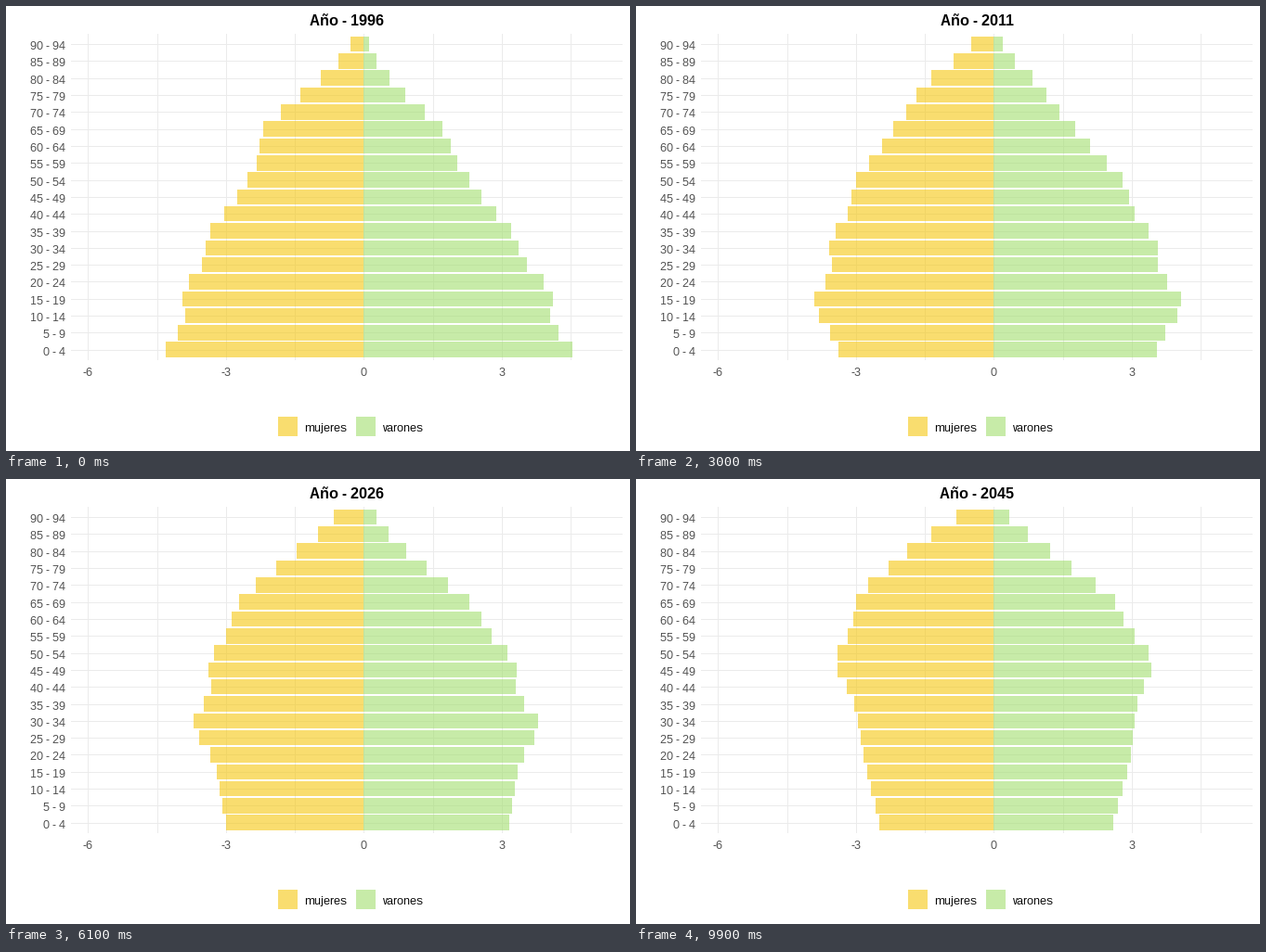
Recreate the animation shown at these times as a matplotlib script. Size 672 by 480 pixels, loop 10000 ms.

```python
import numpy as np
import matplotlib.pyplot as plt
from matplotlib.animation import FuncAnimation
from matplotlib.patches import Rectangle

W, H, DPI = 672, 480, 96
FRAMES, INTERVAL = 100, 100
FIRST, LAST = 1996, 2045
ZERO, UNIT = 385.3, 49.5          # pixel of x = 0, pixels per percent
BOTTOM, STEP, BAR = 370.7, 18.31, 16.5
YELLOW, GREEN, GRID, GREY = "#F5C710", "#A2DF6E", "#EBEBEB", "#4D4D4D"
ALPHA = 0.6

AGES = np.arange(19)              # five-year groups, youngest first

# Turning points of cohort size: birth year, length in pixels.
BIRTHS = [(1903, 58), (1928, 135), (1938, 132), (1948, 149),
          (1959, 177), (1968, 178), (1974, 192), (1979, 195),
          (1984, 187), (1989, 193), (1994, 203), (1999, 192),
          (2004, 175.5), (2009, 165), (2024, 148), (2043, 122)]


def women(year):
    """Cohort size times survival, with an early rise in the level."""
    cohort = np.interp(year - 5 * AGES - 2.5, *zip(*BIRTHS))
    old = 16.9 + 0.006 * (year - 2018)
    survival = np.exp(-0.0165 * AGES) / (1 + np.exp((AGES - old) / 1.4))
    level = 1 + 0.055 * np.exp((FIRST - year) / 6)
    return cohort * survival * level


def sex_ratio(year):
    """Men per woman: falls with age, with a dip in mid life that fades."""
    power = 2.7 + 0.025 * (year - FIRST)
    fade = 1 / (1 + np.exp((year - 2026) / 6))
    dip = 0.04 * fade * np.exp(-((AGES - 7) / 3) ** 2)
    return 1.055 - 0.63 * (AGES / 18) ** power - dip


plt.rcParams.update({
    "font.family": "Liberation Sans",
    "text.hinting": "native",
    "text.hinting_factor": 1,
})
fig = plt.figure(figsize=(W / DPI, H / DPI), dpi=DPI, facecolor="white")
ax = fig.add_axes([0, 0, 1, 1])
ax.set_xlim(0, W)
ax.set_ylim(H, 0)
ax.axis("off")


def box(x, y, w, h, color, alpha=1, z=1):
    return ax.add_patch(Rectangle((x, y), w, h, facecolor=color, alpha=alpha,
                                  linewidth=0, antialiased=False, zorder=z))


def label(x, y, s, size=12, color=GREY, ha="center", **kw):
    return ax.text(x, y, s, fontsize=size * 72 / DPI, color=color, ha=ha,
                   va="baseline", **kw)


centers = BOTTOM - STEP * AGES
for age, y in zip(AGES, centers):
    box(70, round(y), 594, 1, GRID)
    label(64, round(y) + 6, f"{5 * age} - {5 * age + 4}", ha="right")

for value in np.arange(-6, 5, 1.5):
    x = np.floor(ZERO + UNIT * value + 0.5)
    box(x, 30, 1, 352, GRID)
    if value % 3 == 0:
        label(x, 399, f"{value:.0f}")

tops = np.round(centers - BAR / 2)
heights = np.round(centers + BAR / 2) - tops
left = [box(385, y, 0, h, YELLOW, ALPHA, 2) for y, h in zip(tops, heights)]
right = [box(385, y, 0, h, GREEN, ALPHA, 2) for y, h in zip(tops, heights)]

for x, color, name in ((293, YELLOW, "mujeres"), (377, GREEN, "varones")):
    box(x, 443, 21, 21, color, ALPHA)
    label(x + 28.5, 459, name, color="black", ha="left")

title = label(367, 21, "", 16, "black", weight="bold")


def update(frame):
    year = FIRST + (LAST - FIRST) * frame / (FRAMES - 1)
    title.set_text(f"Año - {int(year + 0.5)}")
    w = women(year)
    m = w * sex_ratio(year)
    for bar, n in zip(left, np.round(w)):
        bar.set_x(385 - n)
        bar.set_width(n)
    for bar, n in zip(right, np.round(m)):
        bar.set_width(n)
    return [title, *left, *right]


anim = FuncAnimation(fig, update, frames=FRAMES, interval=INTERVAL,
                     repeat=True, repeat_delay=0, blit=False)
plt.show()
```
